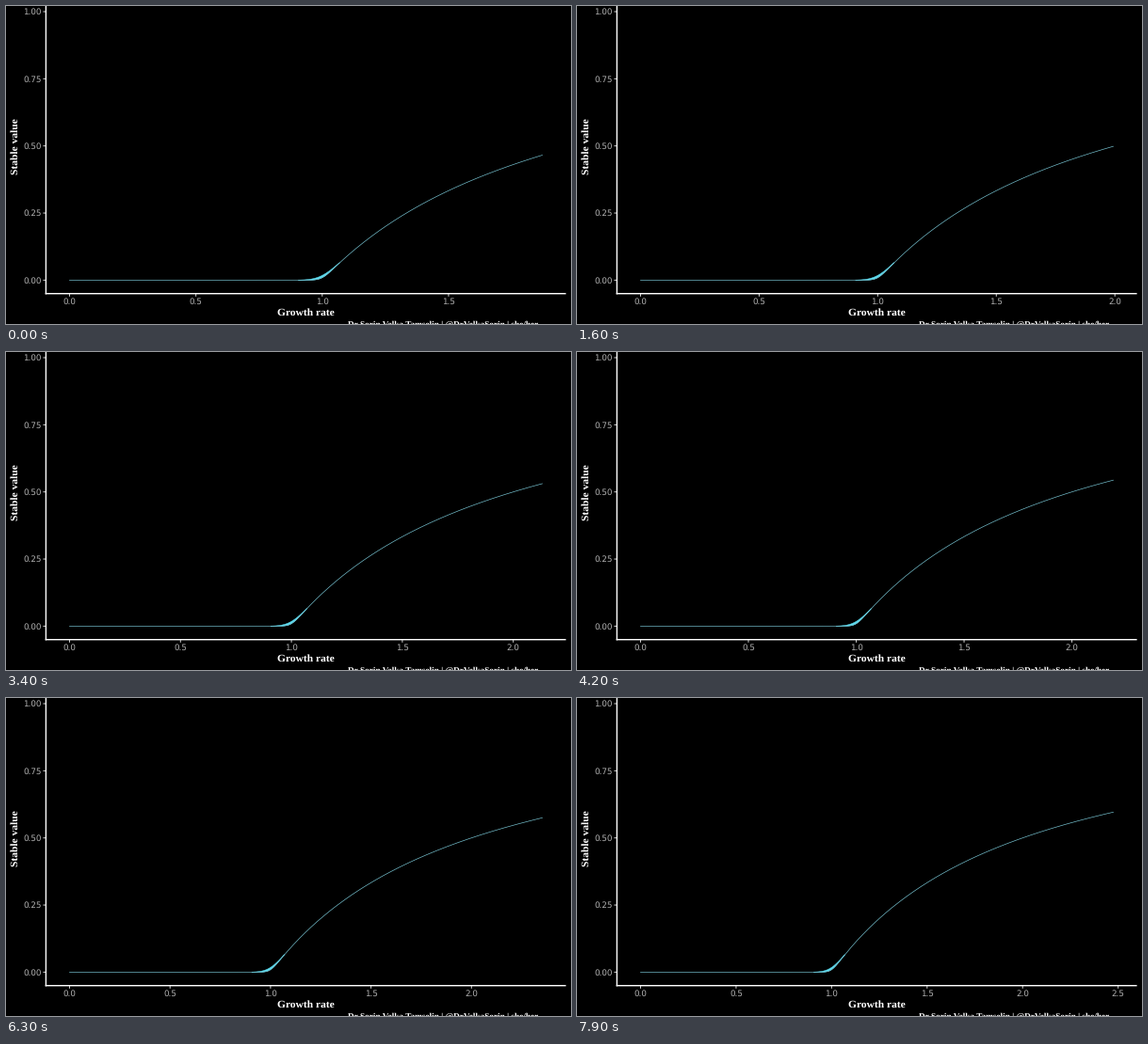
Animation of 600x338 px, one loop 8 s. Source, as a matplotlib script:

```python
import numpy as np
import matplotlib.pyplot as plt
from matplotlib.animation import FuncAnimation

plt.rcParams["path.snap"] = False
plt.rcParams["text.hinting"] = "no_hinting"

W, H, DPI = 600, 338, 100
FRAMES, INTERVAL = 80, 100
PX = 72 / DPI  # points per pixel

X0, X1 = 67.5, 569.5      # screen x of r = 0 and r = r_max
Y0, Y1 = 291.4, 6.0       # screen y of value 0 and value 1
LEFT, RIGHT, BOTTOM = 42.4, 594.6, 305.7

R_START, R_STEP = 1.871, 0.00764
BURN_IN, LAST = 50, 100

CYAN, LINE = "#5cdcf0", "#74bfcd"
GREY, TICK = "#b0b0b0", "#cccccc"


def iterate(r):
    """Logistic map values after BURN_IN and after LAST steps."""
    x = np.full_like(r, 0.5)
    for n in range(1, LAST + 1):
        x = r * x * (1 - x)
        if n == BURN_IN:
            early = x
    return early, x


def sy(v):
    return Y0 + (Y1 - Y0) * v


fig = plt.figure(figsize=(W / DPI, H / DPI), dpi=DPI, facecolor="black")
ax = fig.add_axes([0, 0, 1, 1])
ax.set_xlim(0, W)
ax.set_ylim(H, 0)
ax.axis("off")


def segment(xs, ys, color="white", width=1.4):
    return ax.plot(xs, ys, color=color, lw=width * PX,
                   solid_capstyle="butt")[0]


def label(x, y, text, size, **kw):
    kw = {"ha": "center", "va": "baseline", "color": "white",
          "family": "Liberation Serif", "weight": "bold", **kw}
    return ax.text(x, y, text, fontsize=size * PX, **kw)


def tick_label(x, y, text, **kw):
    return label(x, y, text, 8.8, color=GREY, family="DejaVu Sans",
                 weight="normal", **kw)


# Value axis
for v in np.linspace(0, 1, 5):
    segment([39.4, LEFT], [sy(v)] * 2, TICK, 1)
    tick_label(37.6, sy(v) + 3.2, f"{v:.2f}", ha="right")

# Rate axis, rescaled as the range grows
x_ticks = []
for r in np.arange(0, 2.6, 0.5):
    mark = segment([X0, X0], [BOTTOM, 308.8], TICK, 1)
    x_ticks.append((r, mark, tick_label(X0, 317, f"{r:.1f}")))

# Curve and the band of values that have not settled yet
curve, = ax.plot([], [], color=LINE, lw=0.68 * PX)
band, = ax.fill([0, 0, 0], [0, 0, 0], fc=CYAN, ec=CYAN, lw=0.45 * PX)

segment([LEFT, LEFT], [-2, BOTTOM + 0.7])
segment([LEFT - 0.7, RIGHT], [BOTTOM, BOTTOM])

label(318.7, 328.7, "Growth rate", 11.5)
label(13, 148.7, "Stable value", 11.5, rotation=90, rotation_mode="anchor")
label(363, 341.3, "Dr Sorin Velka Tamselin | @DrVelkaSorin | she/her", 9.3,
      ha="left")


def update(i):
    r_max = R_START + R_STEP * i
    scale = (X1 - X0) / r_max

    r = np.linspace(0, r_max, 1200)
    early, late = iterate(r)
    x = X0 + scale * r
    curve.set_data(x, sy(late))

    near = (r > 0.905) & (r < 1.07)
    xb = x[near]
    band.set_xy(np.column_stack([
        np.r_[xb, xb[::-1]],
        np.r_[sy(early[near]), sy(late[near])[::-1]],
    ]))

    for value, mark, text in x_ticks:
        tx = X0 + scale * value
        shown = tx <= RIGHT
        mark.set_xdata([tx, tx])
        text.set_x(tx)
        mark.set_visible(shown)
        text.set_visible(shown)
    return []


anim = FuncAnimation(fig, update, frames=FRAMES, interval=INTERVAL,
                     repeat=True, repeat_delay=0, blit=False)
plt.show()
```
